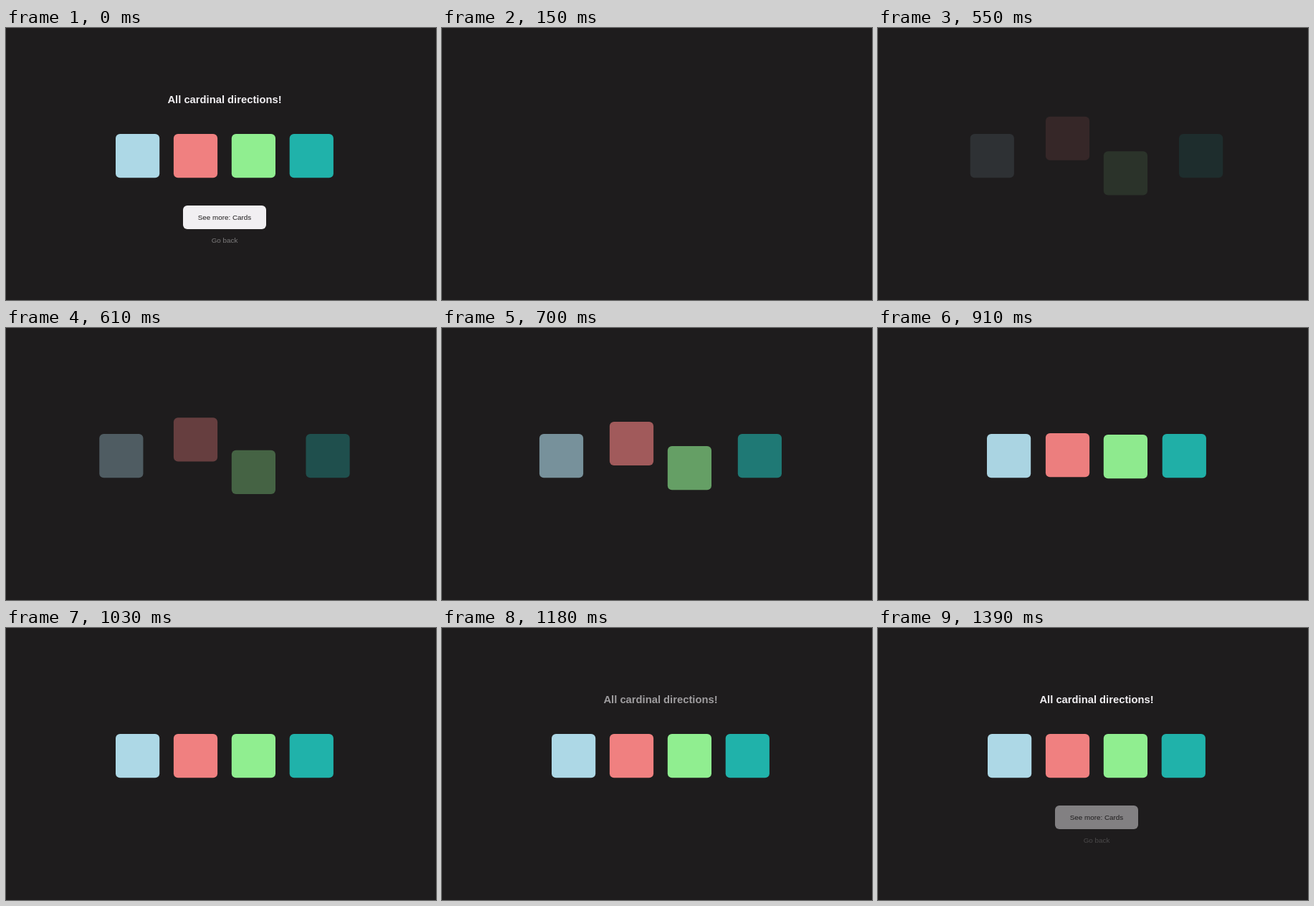
An HTML page that plays this animation: 600 px wide and 380 px high, repeating every 1.42 s.

```html
<!DOCTYPE html>
<html lang="en">
<head>
<meta charset="utf-8">
<title>Cardinal directions</title>
<style>
  html, body { margin: 0; width: 100%; height: 100%; overflow: hidden; background: #1e1c1d; }
  svg { display: block; width: 600px; height: 380px; }
  text { font-family: "Liberation Sans", Arial, sans-serif; font-size: 9.85px; text-anchor: middle; }
  #title { font-size: 14.77px; font-weight: bold; fill: #f1eff2; }
  #button { fill: #f1eff2; }
  #label { fill: #1e1c1d; }
  #back { fill: #7d7b7c; }
</style>
</head>
<body>
<svg viewBox="0 0 600 380">
  <text id="title" x="305" y="105">All cardinal directions!</text>
  <g id="cards"></g>
  <g id="actions">
    <rect id="button" x="247" y="248" width="116" height="33" rx="6"/>
    <text id="label" x="305" y="268.3">See more: Cards</text>
    <text id="back" x="305" y="300">Go back</text>
  </g>
</svg>
<script>
  const LOOP = 1420, HOLD = 150, ENTER = 550, STEP = 30;
  const SIZE = 61.2, PITCH = 80.9, LEFT = 153, TOP = 148, TRAVEL = 24.5;

  // colour and the direction each card comes from
  const cards = [
    ["#add8e6", -1, 0],
    ["#f08080", 0, -1],
    ["#90ee90", 0, 1],
    ["#20b2aa", 1, 0]
  ].map(([fill, dx, dy], i) => {
    const el = document.createElementNS("http://www.w3.org/2000/svg", "rect");
    const attrs = { x: LEFT + i * PITCH, y: TOP, width: SIZE, height: SIZE, rx: 6, fill };
    for (const key in attrs) el.setAttribute(key, attrs[key]);
    document.getElementById("cards").append(el);
    return { el, dx, dy };
  });
  const title = document.getElementById("title");
  const actions = document.getElementById("actions");

  const progress = (t, start, length) => Math.min(1, Math.max(0, (t - start) / length));
  const easeOut = p => 1 - (1 - p) ** 2;
  const easeInOut = p => p < 0.5 ? 2 * p * p : 1 - 2 * (1 - p) ** 2;

  // The full scene holds, cuts to empty, then builds up in fixed steps.
  function sceneTime(t) {
    if (t < HOLD) return LOOP + HOLD;
    if (t < ENTER) return 0;
    return ENTER + Math.floor((t - ENTER) / STEP) * STEP;
  }

  function draw(now) {
    const t = sceneTime(now % LOOP);
    const p = progress(t, 525, 450);
    const offset = TRAVEL * (1 - easeInOut(p));
    for (const { el, dx, dy } of cards) {
      el.setAttribute("transform", `translate(${dx * offset} ${dy * offset})`);
      el.setAttribute("opacity", easeOut(p));
    }
    title.setAttribute("opacity", progress(t, 1058, 200));
    actions.setAttribute("opacity", progress(t, 1300, 190));
  }

  const start = performance.now();
  function tick() {
    draw(performance.now() - start);
    requestAnimationFrame(tick);
  }
  tick();
</script>
</body>
</html>
```
